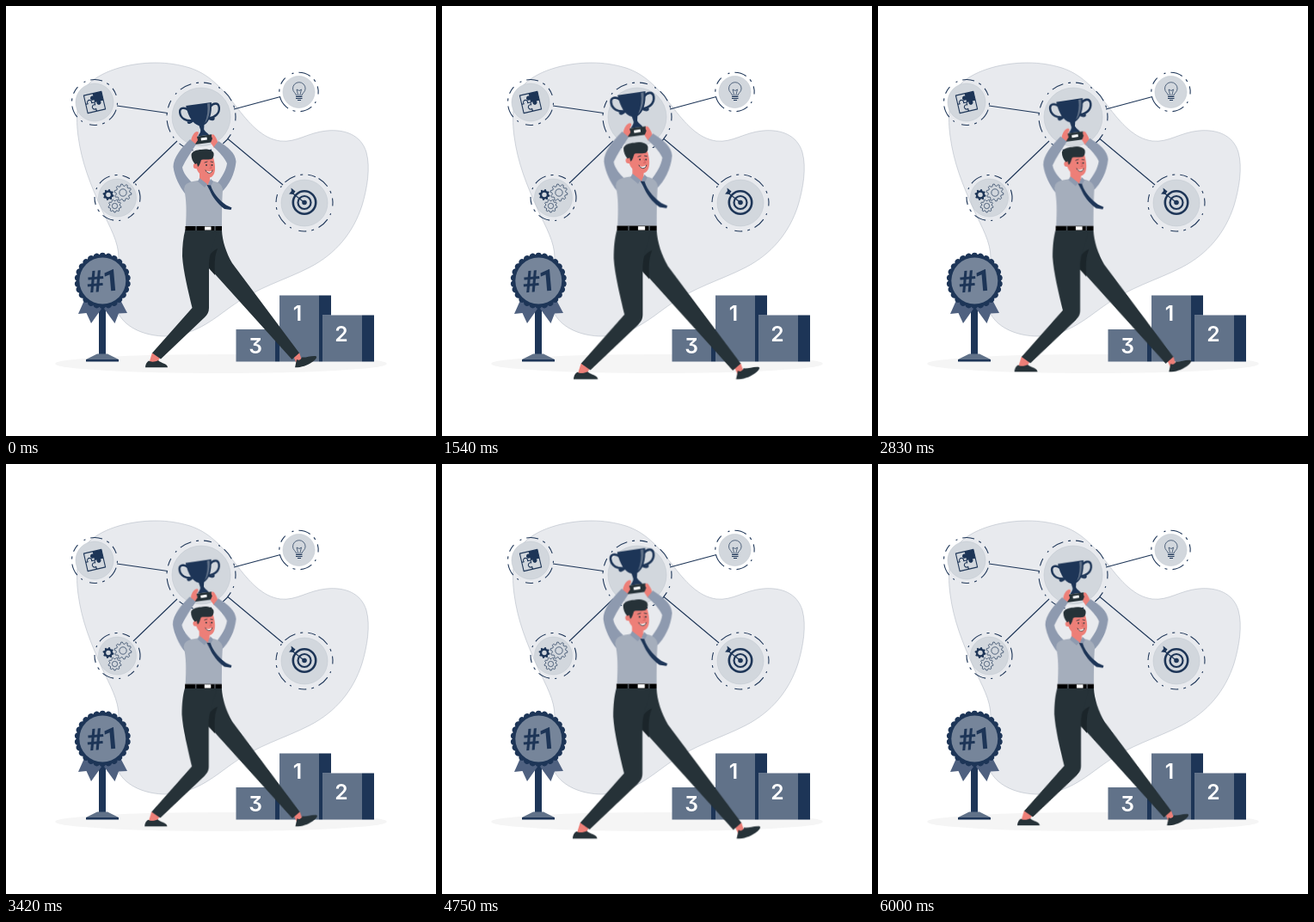
Recreate the animation shown at these times as an HTML page. Size 500 px wide and 500 px high, loop 6.04 s.

```html
<!DOCTYPE html>
<html lang="en">
<head>
<meta charset="utf-8">
<title>Winner</title>
<style>
  html, body { margin: 0; width: 100%; height: 100%; overflow: hidden; background: #fff; }
  svg { display: block; width: 100vw; height: 100vh; }
  .navy { fill: #1d3557; }
  .slate { fill: #617289; }
  .black { fill: #263238; }
  .skin { fill: #ed7f78; }
  .sleeve { fill: #8e9aaf; }
  .line { fill: none; stroke: #1d3557; stroke-width: 1.1; stroke-linejoin: round; }
  .thin { stroke-width: .7; }
  .handle { stroke-width: 2.4; stroke-linecap: round; }
  .rank { font: 600 24.7px Inter, "Open Sans", sans-serif; font-feature-settings: "cv09"; fill: #fff; text-anchor: middle; }
  .medal { font: 700 35px Roboto, "Liberation Sans", sans-serif; fill: #1d3557; text-anchor: middle; letter-spacing: -2px; }
  #man { transform-origin: 267px 260px; }
</style>
</head>
<body>
<svg viewBox="0 0 500 500">
  <path fill="#e8eaee" stroke="#a9b1bd" stroke-width=".5" d="M174 66C142 66 108 76 93 94C82 107 81 130 84 152C88 182 98 207 111 236C121 258 131 274 131 293C131 315 120 337 131 358C140 375 163 384 186 384C219 383 239 366 261 350C292 327 324 319 353 304C384 288 404 263 414 232C420 212 424 188 419 170C413 150 394 143 373 145C351 147 338 159 319 157C298 154 283 137 267 116C249 93 235 79 214 72C201 68 188 66 174 66Z"/>
  <ellipse cx="250" cy="416" rx="193" ry="11" fill="#f5f5f5"/>

  <path class="line" d="M129 116L188 124.500M265 120L319 105.500M199 157L148 206M258 154.500L322 208"/>
  <g id="bubbles"></g>

  <!-- puzzle -->
  <g transform="translate(103 112) rotate(-13)">
    <path class="navy" d="M0-10.500H10.500V0H7A2.600 2.600 0 1 1 2.500 0H0V-3A2.600 2.600 0 1 1 0-7.500Z"/>
    <path class="line" d="M-10.500-10.500H10.500V10.500H-10.500ZM-10.500 0H-8A2.600 2.600 0 1 1-3.500 0H0V3A2.600 2.600 0 1 0 0 7.500V10.500"/>
  </g>

  <!-- light bulb -->
  <path class="line thin" d="M337.500 104C337 101 333.500 100 333.500 96A7.300 7.300 0 0 1 348.100 96C348.100 100 344.500 101 344 104ZM339.500 103L338 97L341 98.500L343.500 97L342 103"/>
  <path class="line" d="M337 105.500H344.500M337 107.500H344.500M339 109.500H343"/>

  <!-- gears -->
  <g id="gears"></g>

  <!-- target -->
  <g fill="none" stroke="#1d3557">
    <circle cx="347" cy="228.500" r="13.200" stroke-width="2.600"/>
    <circle cx="347" cy="228.500" r="7.500" stroke-width="2.200"/>
    <path stroke-width="1.300" d="M331 216L347 228.500"/>
  </g>
  <circle class="navy" cx="347" cy="228.500" r="2.800"/>
  <path class="navy" d="M329 218.500L334 219L336.500 215.500L331.500 211.500L332 215.500Z"/>

  <!-- rosette -->
  <path class="navy" d="M108 345H116V406H108Z"/>
  <path fill="#4f6180" d="M92 340L84 358L93.500 357L99 369L116 345ZM132 340L141 357L131 357.500L126.500 369L109 345Z"/>
  <path class="slate" d="M106 404.500H118L131 411H93Z"/>
  <path class="navy" d="M93 411H131V413.500H93Z"/>
  <path id="scallop" class="navy"/>
  <circle cx="112.300" cy="319.500" r="27" fill="#76859a"/>
  <text class="medal" transform="translate(113 332) rotate(-5)">#1</text>

  <!-- podium -->
  <path class="slate" d="M267.500 376H313V413.500H267.500ZM318 336.500H364V413.500H318ZM368 359.500H414V413.500H368Z"/>
  <path class="navy" d="M313 376H318V413.500H313ZM364 336.500H378V359.500H368V413.500H364ZM414 359.500H428V413.500H414Z"/>
  <text class="rank" x="290" y="404">3</text>
  <text class="rank" x="339" y="366">1</text>
  <text class="rank" x="390" y="390">2</text>

  <g id="man">
    <!-- trophy -->
    <g transform="translate(224 114) rotate(-8)">
      <path class="line handle" d="M-13 5C-17 1-23 1-23 7C-23 14-17 18-9 18C-12 20-15 21-15 19M13 5C17 1 23 1 23 7C23 14 17 18 9 18C12 20 15 21 15 19"/>
      <path class="navy" d="M-15 0H15C14 13 10 22 3 25L2 30C3 33 5 34 7 37H-6C-4 34-2 33-2 30L-3 25C-10 22-14 13-15 0Z"/>
      <path fill="#617289" d="M10 1H13C12 12 9 19 4 23C8 16 10 9 10 1Z"/>
      <path class="black" d="M-9 37H10L12 46H-12Z"/>
      <path fill="#fff" d="M-3 39.500H4V42.500H-3Z"/>
    </g>

    <!-- hands and arms -->
    <path class="skin" d="M215 159C215 153 218 147 222 146C225 146 224 149 222 152L223 156L219 162ZM240 154C238 151 239 148 242 150C245 154 246 157 247 161L242 165L238 159Z"/>
    <path class="sleeve" d="M214 155C204 165 194.500 176 194.500 187C196 199 202 210 208 218L217 206C211 200 206 194 205 187.500C209 179 215 170 221 161Z"/>
    <path class="sleeve" d="M247 157C258 164 267 171 267.500 181C266 195 260 208 250 217L245 207C251 199 256 191 257 183C254 176 248 170 241.500 164Z"/>

    <!-- legs -->
    <path class="skin" d="M170 403L179 409L175 416H166ZM334 407L341 403L344 412L338 416Z"/>
    <path class="black" d="M166 412.500C169 414.500 174 413.500 177 412C180 415.500 188 415.500 188 420.300H162C162 417 163.500 414 166 412.500ZM338 411C341 413 343 411 344 408.500C349 409 354 406.500 360 407C363 408 359 412 356 414C350 418 344 420.300 336 420.300Z"/>
    <path class="black" d="M232 261H251C251.500 273 256 287 263 299L341 403.500L332.500 411L236 304Z"/>
    <path fill="#1b252a" d="M236 291C238 287 242 284 246 282C243 290 242 296 243 313L235 304Z"/>
    <path class="black" d="M208.500 260H245C244 272 237 284 236 299V351C236 356 234 359 231 362L180 410.500L170 403.500L216.500 351C212 332 206 308 205 291C205 279 206 269 208.500 260Z"/>

    <!-- shirt -->
    <path fill="#a5aebc" d="M208 209C212 203 222 204 227 202L238 203C246 204 251 207 252 213C251 228 251 243 251 256H209C210 239 210 225 207 213Z"/>
    <path d="M208.500 256H251V261H208.500Z"/>
    <path fill="#fff" d="M231 256.500H238.500V260.500H231Z"/>
    <path stroke="#78828c" stroke-width="1" d="M221 256V261M243 256V261"/>

    <!-- head -->
    <path class="skin" d="M225 192H237V203L235 208C229 207 225 204 225 201Z"/>
    <path class="sleeve" d="M225 200L234 207L231 211L223 204ZM238 201L235 207L238 210L241 204Z"/>
    <path class="skin" d="M221 177C226 172 238 171 241 176C243 183 244 190 242 195C240 200 234 201.500 229 198C224 195 222 191 221 187Z"/>
    <circle class="skin" cx="221" cy="186" r="3.200"/>
    <path class="black" d="M220 184C217 181 215.500 177 215.500 173C216 169 222 167 227 167C233 165.500 240 167 241.500 171C242 174 241 177 239 178C234 179 229 178 227 179C226 182 225 186 223 187L222 183Z"/>
    <path fill="#fff" d="M232.500 191.500C235 193 237.500 193 239.500 191C239.500 195 235 196 232.500 191.500Z"/>
    <path fill="none" stroke="#263238" stroke-width=".8" stroke-linecap="round" d="M231 182L234 181M238 181L240.500 181.500M232 191C234 195.500 239 195.500 240 191"/>
    <g class="black"><circle cx="233" cy="185" r=".9"/><circle cx="239.500" cy="185" r=".9"/></g>
    <path fill="none" stroke="#cf5f60" stroke-width=".8" d="M237 184L239 188.500H236.500"/>

    <!-- tie -->
    <path class="navy" d="M233.500 208L238 208.500L239.500 212.500C243 220 249 226.500 256 231.500L262.500 234.500L261.500 237L254 236C246 230 240 222 237 214.500Z"/>
  </g>
</svg>
<script>
  const NS = "http://www.w3.org/2000/svg";
  const byId = id => document.getElementById(id);

  function add(parent, tag, attrs) {
    const el = document.createElementNS(NS, tag);
    for (const key in attrs) el.setAttribute(key, attrs[key]);
    return parent.appendChild(el);
  }

  // Icon bubbles: x, y, disc radius, dashed ring radius, ring rotation
  const bubbles = [
    [103, 112, 22, 26.5, 20],
    [227, 129, 34, 40, 75],
    [340.5, 100, 18.5, 22.7, 130],
    [129.5, 223, 22, 26.5, 220],
    [347, 229, 27, 33, 300]
  ];
  for (const [x, y, r, ring, turn] of bubbles) {
    add(byId("bubbles"), "circle", { cx: x, cy: y, r, fill: "#d2d7dd", stroke: "#bcc4cd", "stroke-width": .5 });
    add(byId("bubbles"), "circle", {
      cx: x, cy: y, r: ring, class: "line",
      "stroke-dasharray": "14 6 3 6 9 9 2 6",
      transform: `rotate(${turn} ${x} ${y})`
    });
  }

  function gearPath(x, y, r, teeth) {
    const points = [];
    for (let i = 0; i < teeth * 4; i++) {
      const a = (i + .5) * Math.PI / (teeth * 2);
      const d = i % 4 < 2 ? r : r * .78;
      points.push(`${(x + d * Math.cos(a)).toFixed(2)} ${(y + d * Math.sin(a)).toFixed(2)}`);
    }
    return `M${points.join("L")}Z`;
  }

  function gear(x, y, r, teeth, solid) {
    const g = byId("gears");
    add(g, "path", { d: gearPath(x, y, r, teeth), class: solid ? "navy" : "line thin" });
    add(g, "circle", { cx: x, cy: y, r: r * .42, ...(solid ? { fill: "#d2d7dd" } : { class: "line thin" }) });
  }
  gear(119, 219.5, 6.5, 8, true);
  gear(136, 217, 10, 10, false);
  gear(126.5, 232.5, 7.5, 9, false);

  function scallopPath(x, y, r, bumps) {
    const at = i => {
      const a = i * 2 * Math.PI / bumps;
      return `${(x + r * Math.cos(a)).toFixed(2)} ${(y + r * Math.sin(a)).toFixed(2)}`;
    };
    let d = `M${at(0)}`;
    for (let i = 1; i <= bumps; i++) d += `A4 4 0 0 1 ${at(i)}`;
    return d + "Z";
  }
  byId("scallop").setAttribute("d", scallopPath(112.3, 319.5, 30.5, 26));

  // Pulse: time in ms, scale
  const LOOP = 6040;
  const pulse = [[0, 1], [1200, 1.1], [3600, 1], [4800, 1.1], [6000, 1], [LOOP, 1]];
  byId("man").animate(
    pulse.map(([t, s]) => ({ offset: t / LOOP, transform: `scale(${s})` })),
    { duration: LOOP, iterations: Infinity }
  );
</script>
</body>
</html>
```
